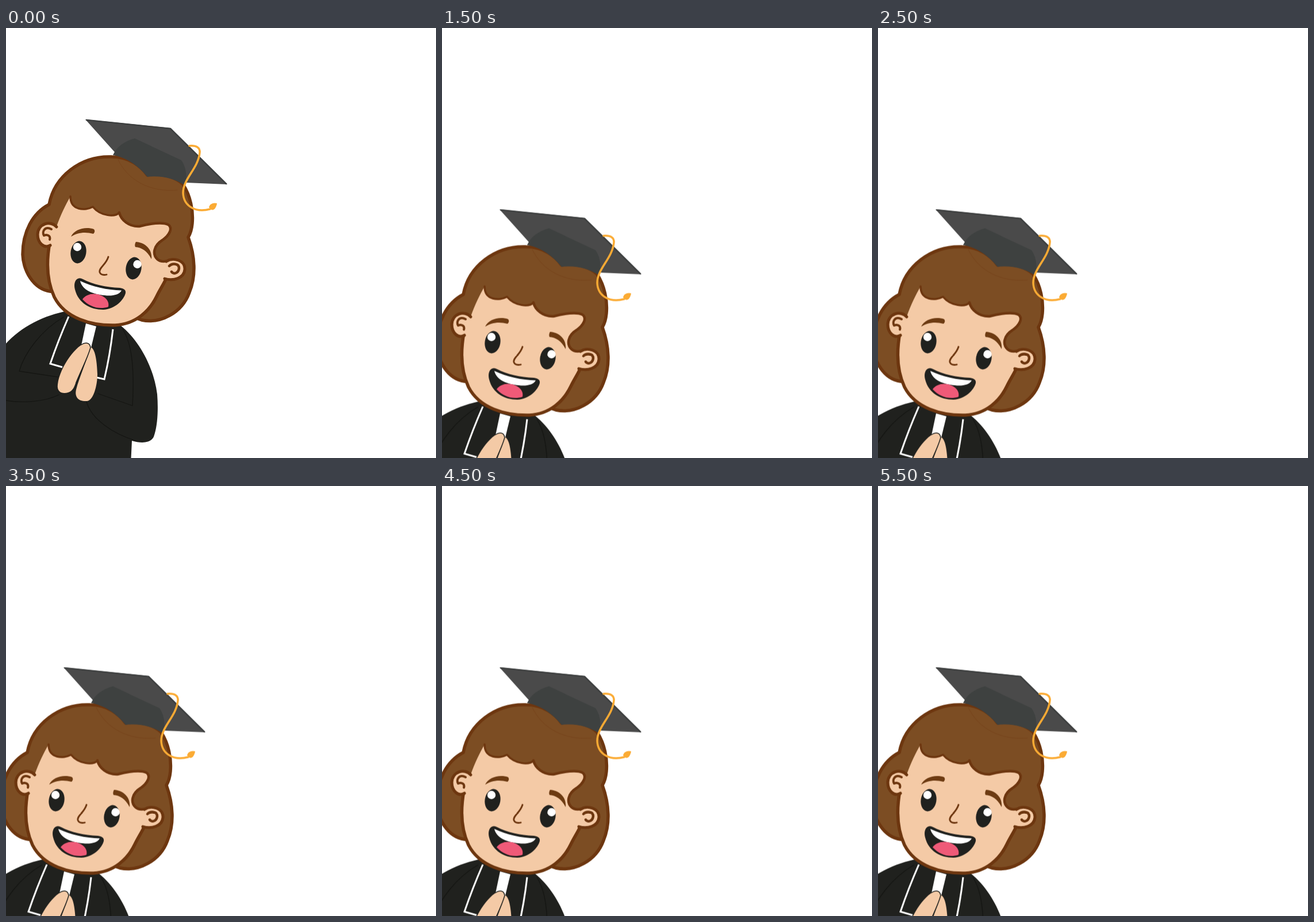
Write an HTML page that moves like this. It is 748 by 748 pixels and loops after 6 s.

```html
<!DOCTYPE html>
<html lang="en">
<head>
<meta charset="utf-8">
<title>Graduate</title>
<style>
  html, body { margin: 0; width: 100%; height: 100%; overflow: hidden; background: #fff; }
  svg { display: block; width: 100vw; height: 100vh; }
  .girl { animation: hop 1s step-end infinite; }
  @keyframes hop {
    0% { transform: translate(0, 0); }
    50%, 100% { transform: translate(-38px, 156.5px); }
  }
  path { stroke-linejoin: round; stroke-linecap: round; }
  .gown, .ink { fill: #20211e; }
  .fold { fill: none; stroke: #151613; stroke-width: 1.3; }
  .trim { fill: none; stroke: #fff; stroke-width: 3; stroke-linejoin: miter; stroke-linecap: butt; }
  .white { fill: #fff; }
  .skin { fill: #f4caa6; }
  .hair { fill: #7c4d23; }
  .edge { stroke: #6d360f; stroke-width: 5.5; }
  .line { fill: none; stroke: #6d360f; }
  .brow { fill: #6d3b12; }
  .tongue { fill: #ef5a78; }
  .board { fill: #4a4a4a; }
  .rim { fill: none; stroke: #3d3f3f; stroke-width: 2.5; }
  .band { fill: #3e4140; }
  .cord { fill: none; stroke: #fbab34; stroke-width: 3.5; }
  .bulb { fill: #fbab34; }
</style>
</head>
<body>
<svg viewBox="0 0 748 748">
  <g class="girl">
    <g id="body">
      <path class="gown" d="M-2 551C28 518 66 500 108 492L200 518C232 544 257 590 263 637C265 662 264 692 257 711C252 722 236 723 219 718L217 760H-2Z"/>
      <path class="fold" d="M100 503C62 525 32 565 23 597L90 607M0 648C30 653 68 650 92 638M203 524C221 552 223 600 220 657L160 636M140 650C148 680 186 706 226 718"/>
      <path class="trim" d="M109 502Q91 543 77 584L98 590M186 524Q181 569 171 611L158 608"/>
      <path class="white" d="M139 514L157 519L148 556L131 552Z"/>
      <path class="skin" d="M139 548C124 550 94 588 90 620C88 634 99 637 108 634C117 631 119 623 122 615L147 558C147 550 144 547 139 548Z"/>
      <path class="skin" d="M147 555C155 558 158 577 159 602C159 622 152 648 141 649C126 650 119 642 122 629C127 609 140 580 147 555Z"/>
      <path d="M131 551C138 546 146 547 147 556C141 577 131 594 122 617" fill="none" stroke="#20211e" stroke-width="1.5"/>
    </g>

    <g id="head">
      <path class="hair edge" d="M75 307C84 258 130 222 184 224C215 224 235 241 246 256C270 252 295 259 308 272C321 292 326 318 324 340C323 352 320 359 317 364C330 400 330 434 319 460C306 496 268 515 236 508L90 458C52 463 30 425 29 394C29 355 46 322 75 307Z"/>
      <path class="skin" d="M112 293C112 318 138 318 151 311C165 328 190 329 197 321C200 334 214 346 232 345C252 340 272 337 282 342C291 348 284 361 272 369C256 379 255 394 263 402C270 408 277 406 281 405L278 437C274 446 267 456 262 467C250 492 226 515 190 517C148 518 103 505 84 468C71 440 69 405 76 372L88 345C95 325 103 309 112 293Z"/>
      <path class="line edge" d="M76 374C70 407 71 440 84 468C103 505 148 518 190 517C226 515 250 492 262 467C267 456 274 446 278 437"/>
      <path class="line" stroke-width="3.5" d="M112 293C112 318 138 318 151 311C165 328 190 329 197 321"/>
      <path class="line" stroke-width="4.5" d="M197 321C200 334 214 346 232 345C252 340 272 337 282 342C291 348 284 361 272 369C256 379 255 394 263 402C270 408 277 406 281 405"/>
      <path class="line" stroke-width="1" opacity=".35" d="M195 229C212 265 250 286 298 282"/>

      <path class="skin" d="M88 346C78 335 57 341 56 358C56 374 68 384 79 377Z"/>
      <path class="line" stroke-width="5" d="M88 346C77 334 56 340 55 359C55 375 67 384 77 378"/>
      <path class="line" stroke-width="4" d="M79 350C68 344 62 354 66 361C72 358 78 362 76 368"/>
      <path class="skin" d="M279 406C291 398 312 404 311 420C310 435 291 441 276 436Z"/>
      <path class="line" stroke-width="5" d="M279 406C291 398 312 404 311 420C310 435 291 441 276 436"/>
      <path class="line" stroke-width="4.5" d="M284 414C289 409 301 409 301 418C300 427 291 429 288 424"/>

      <path class="brow" d="M113 363C119 350 138 345 153 350Q156 354 152 358C137 354 124 356 113 363Z"/>
      <path class="brow" d="M226 372C241 373 255 384 253 402C245 387 236 382 225 381Q223 376 226 372Z"/>
      <ellipse class="ink" cx="126" cy="390" rx="13.5" ry="19.5" transform="rotate(9 126 390)"/>
      <ellipse class="ink" cx="222" cy="418" rx="13.5" ry="19.5" transform="rotate(9 222 418)"/>
      <circle class="white" cx="124" cy="381" r="7.2"/>
      <circle class="white" cx="228.5" cy="411" r="7.2"/>
      <path class="line" stroke-width="2.8" d="M178 398C174 412 161 417 163 425C165 430 170 430 175 429"/>

      <path class="ink" d="M125 436C119 439 118 447 120 455C126 479 147 490 169 490C190 489 205 473 208 461C209 455 204 453 198 452C174 451 151 446 134 437Q129 434 125 436Z"/>
      <path class="white" d="M129 440C150 450 176 456 201 456.500C196 466 180 467 164 464C145 461 132 453 129 440Z"/>
      <path class="tongue" d="M133 472C139 463 153 460 165 465C175 469 180 477 178 485C163 490 146 486 133 472Z"/>
    </g>

    <g id="cap">
      <path class="board" d="M138 159L286 174L385 272L313 269L190 217Z"/>
      <path class="rim" d="M140 160L286 175L383 271"/>
      <path class="band" d="M186 221C193 206 206 197 224 192L305 230C314 243 315 258 312 274C292 261 270 256 246 259C230 240 212 226 186 221Z"/>
      <path class="cord" d="M319 205C331 204 338 208 337 217C334 245 308 262 308 287C309 310 330 322 355 315"/>
      <path class="bulb" d="M353 312C354 306 361 303 367 305C366 312 362 318 357 316Z"/>
    </g>
  </g>
</svg>
</body>
</html>
```
